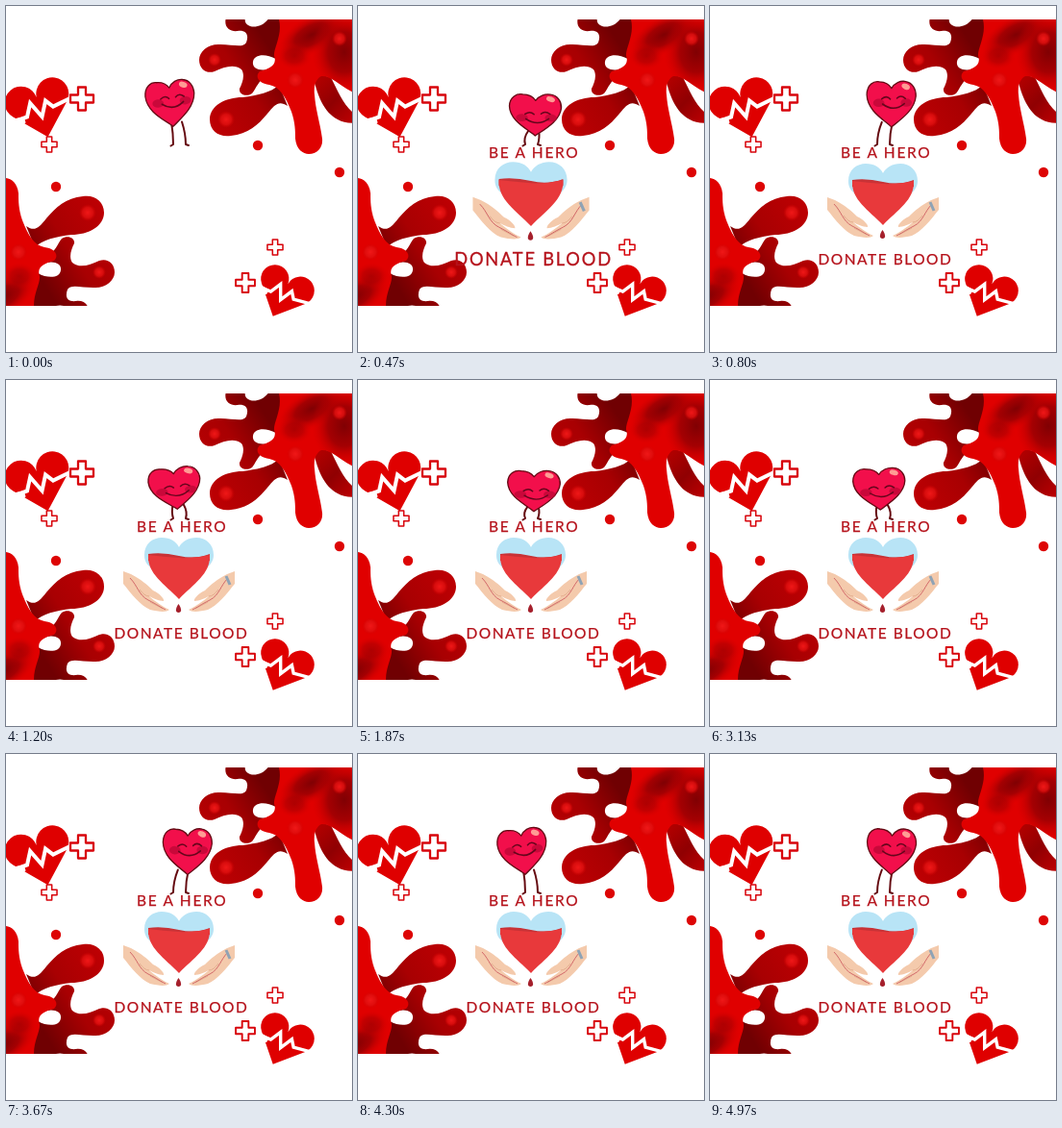
These frames come from a looping animation (360x360 px, 5000 ms). An HTML page:

```html
<!DOCTYPE html>
<html lang="en">
<head>
<meta charset="utf-8">
<title>Donate blood</title>
<style>
html, body { margin: 0; width: 100%; height: 100%; overflow: hidden; background: #fff }
svg { display: block; width: 100vw; height: 100vh }
text { font: 15.5px Lato, "Open Sans", sans-serif; fill: #b5121b; stroke: #b5121b; stroke-width: .25 }
</style>
</head>
<body>
<svg viewBox="0 0 360 360">
<defs>
  <linearGradient id="dark" gradientUnits="userSpaceOnUse" x1="205" y1="110" x2="285" y2="60">
    <stop offset="0" stop-color="#bd0003"/><stop offset=".55" stop-color="#a80002"/><stop offset="1" stop-color="#700002"/>
  </linearGradient>
  <linearGradient id="lobe" gradientUnits="userSpaceOnUse" x1="322" y1="80" x2="360" y2="118">
    <stop offset="0" stop-color="#b00000"/><stop offset=".5" stop-color="#900002"/><stop offset="1" stop-color="#b80002"/>
  </linearGradient>
  <radialGradient id="shade">
    <stop offset="0" stop-color="#800003"/><stop offset=".5" stop-color="#900003" stop-opacity=".75"/><stop offset="1" stop-color="#d00000" stop-opacity="0"/>
  </radialGradient>
  <radialGradient id="shine">
    <stop offset="0" stop-color="#f01818"/><stop offset=".6" stop-color="#e01010" stop-opacity=".8"/><stop offset="1" stop-color="#d00000" stop-opacity="0"/>
  </radialGradient>
  <clipPath id="page"><path d="M0 14H360V312H0Z"/></clipPath>
  <path id="body" d="M284 14C288 30 278 44 279 52C283 62 272 66 264 68C258 74 264 81 274 82C285 84 291 95 297 110C301 122 301 130 301 138C302 149 309 154 315 154C324 154 330 147 329 138C327 122 322 108 321 92C320 84 322 76 328 73C340 72 346 84 370 94V14Z"/>
  <clipPath id="inBody"><use href="#body"/></clipPath>
  <g id="splash">
    <g fill="url(#dark)">
      <path d="M229 12C226 22 233 27 241 26C250 25 253 30 250 38C247 44 236 40 223 40C211 39 201 47 201 56C201 66 209 71 217 68C227 63 238 60 245 66C249 72 246 80 243 86C242 92 250 95 256 91C261 85 262 77 272 74V66C262 68 256 64 257 58C258 50 270 49 281 55L288 46V12H274C269 20 260 23 254 21C249 19 248 16 249 12Z"/>
      <path d="M284 82C276 90 262 93 246 95C228 95 212 104 212 118C212 130 222 137 234 135C252 133 262 124 272 112C280 102 284 98 293 104Z"/>
    </g>
    <path fill="url(#lobe)" d="M319 70C323 92 331 111 345 118C352 122 358 122 370 122V116C354 110 347 92 338 74Z"/>
    <use href="#body" fill="#e00000"/>
    <g clip-path="url(#inBody)" fill="url(#shade)">
      <ellipse cx="318" cy="30" rx="38" ry="19" transform="rotate(-28 318 30)"/>
      <ellipse cx="352" cy="48" rx="34" ry="42"/>
      <ellipse cx="300" cy="52" rx="18" ry="14" opacity=".5"/>
    </g>
    <g fill="url(#shine)">
      <circle cx="229" cy="118" r="9"/><circle cx="217" cy="56" r="7"/>
      <circle cx="301" cy="77" r="9"/><circle cx="347" cy="34" r="8"/>
    </g>
    <circle cx="262" cy="145" r="5.2" fill="#dd0505"/>
  </g>
  <path id="plus" d="M-4-12H4V-4H12V4H4V12H-4V4H-12V-4H-4Z" fill="#fff" stroke="#d8050c" stroke-width="2.3" stroke-linejoin="round"/>
  <g id="pulse">
    <path fill="#df0000" d="M0 42L-29 12A17 17 0 1 1 0-1A17 17 0 1 1 29 12Z"/>
    <path fill="#fff" d="M-36 13L-18 15L-18 21L-30 30Z"/>
    <path fill="none" stroke="#fff" stroke-width="4" d="M-34 17L-15 16L-8 3L0 20L8 5L14 13L36 9"/>
  </g>
  <g id="hand">
    <path fill="#f4caac" d="M122 199L130 202C140 207 147 213 153 219C160 222 165 228 164 230C159 230 153 227 149 225C155 230 163 236 170 239C167 242 158 241 150 239C140 235 130 222 122 212Z"/>
    <path fill="none" stroke="#e0a688" stroke-width=".8" d="M139 218Q144 225 149 225M150 231L163 238"/>
    <path fill="none" stroke="#c9525a" stroke-width=".8" d="M129 206C137 214 138 224 148 229S160 236 166 239"/>
  </g>
</defs>

<g clip-path="url(#page)">
  <use href="#splash"/>
  <use href="#splash" transform="rotate(180 157 166.5)"/>
</g>
<circle cx="347" cy="173" r="5.2" fill="#dd0505"/>
<use href="#pulse" transform="translate(32 96) rotate(-16)"/>
<use href="#pulse" transform="translate(293 290) rotate(25) scale(.86)"/>
<use href="#plus" transform="translate(79 96.5)"/>
<use href="#plus" transform="translate(45 144) scale(.67)"/>
<use href="#plus" transform="translate(280 251) scale(.67)"/>
<use href="#plus" transform="translate(249 288) scale(.83)"/>

<g id="mascot" stroke-linecap="round" stroke-linejoin="round">
  <path id="legs" fill="none" stroke="#650a10" stroke-width="2"/>
  <g id="head">
    <path fill="#f20f4b" stroke="#650a14" stroke-width="1.3" d="M1 23C-7 16-25 8-26-8C-26-18-19-22-13-21C-6-21-2-18 0-15C3-20 9-23 15-22C22-21 26-15 26-8C25 6 11 15 1 23Z"/>
    <ellipse cx="15" cy="-17" rx="4.5" ry="2.8" fill="#ff9c94" transform="rotate(20 15 -17)"/>
    <g id="face">
      <g fill="#b80634" opacity=".7"><ellipse cx="-13" cy="-3" rx="6" ry="4"/><ellipse cx="16" cy="-4" rx="6" ry="4"/></g>
      <path fill="none" stroke="#65061c" stroke-width="1.5" d="M-10-7Q-5-11-1-7M6-8Q10-12 15-8M-9-2Q3 6 14-3"/>
    </g>
  </g>
</g>

<g id="hero"><text x="136" y="158" letter-spacing="1.7">BE A HERO</text></g>
<g id="gift">
  <path fill="#b8e4f6" d="M152 196C146 192 144 188 144 182C144 170 153 164 162 164C171 164 177 168 180 174C183 168 190 164 198 164C208 164 216 171 216 182C216 188 213 192 208 196Z"/>
  <path fill="#c93236" d="M148 181Q163 179 180 183T212 181V188H148Z"/>
  <path fill="#e8393b" d="M148 182Q164 184 180 185T212 182C213 202 195 212 180 228C165 212 147 202 148 182Z"/>
  <use href="#hand"/>
  <use href="#hand" transform="matrix(-1 0 0 1 360 0)"/>
  <path stroke="#8fa3b5" stroke-width="3" d="M229 204L233 213"/>
  <path fill="#a5202c" d="M179.500 233C183 238 183 242 179.500 242S176 238 179.500 233Z"/>
</g>
<g id="donate"><text x="112.500" y="269" letter-spacing="1.52">DONATE BLOOD</text></g>
</svg>
<script>
const $ = id => document.getElementById(id);
const LOOP = 5000, SWAY = 1440;

// Each part drops in from a larger size, one after the other.
const entrances = [["hero", 40, 182, 153], ["gift", 120, 180, 203], ["donate", 200, 181.5, 263]];

function enter(t, [id, delay, x, y]) {
  const p = Math.min(1, Math.max(0, (t - delay) / 430));
  const s = 1 + 1.3 * (1 - p) ** 2;
  $(id).setAttribute("transform", `translate(${x} ${y}) scale(${s}) translate(${-x} ${-y})`);
  $(id).setAttribute("opacity", Math.min(1, p * 2));
}

// The heart swings from side to side, crouching in the middle.
function dance(t) {
  const a = t / SWAY * 2 * Math.PI, c = Math.cos(a);
  const lift = Math.min(1, 1.1 * c * c), squat = 1 - lift;
  const x = 180 - 9 * c, w = 51 + 4 * squat, h = 49 - 6 * squat;
  const y = 95 - 18.5 * lift + h / 2, tilt = 2 * Math.sin(a) - 3.5 * c - 1;
  $("head").setAttribute("transform", `translate(${x} ${y}) rotate(${tilt}) scale(${w / 52} ${h / 46})`);
  $("face").setAttribute("transform", `translate(0 ${2.5 + 6 * squat})`);
  const hip = y + h / 2 - 5, mid = 181 - 3.5 * c, knee = (hip + 145) / 2, bend = 3 * squat;
  $("legs").setAttribute("d",
    `M${mid - 5.5} ${hip}Q${174 - bend} ${knee} 174 144L171.500 145.500` +
    `M${mid + 5.5} ${hip}Q${187 + bend} ${knee} 187 144L190 145`);
}

function draw() {
  const t = performance.now() % LOOP;
  entrances.forEach(e => enter(t, e));
  dance(t);
  requestAnimationFrame(draw);
}
draw();
</script>
</body>
</html>
```
